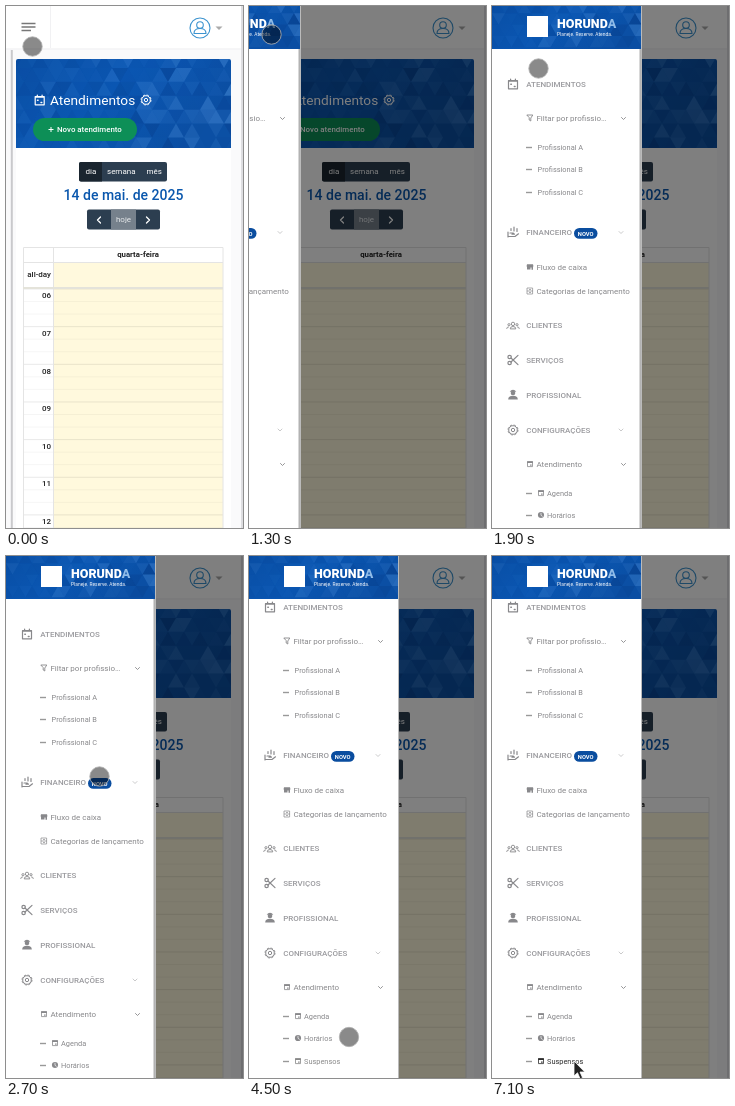
Recreate the animation shown at these times as an HTML page. Size 237 by 522 pixels, loop 8000 ms.

```html
<!DOCTYPE html>
<html lang="pt-BR">
<head>
<meta charset="utf-8">
<title>Agenda</title>
<style>
  html, body { margin: 0; width: 100%; height: 100%; overflow: hidden; background: #fff; }
  svg { display: block; width: 100%; height: 100%; }
  text { font-family: Roboto, sans-serif; font-size: 8px; white-space: pre; }
  .end { text-anchor: end; }
  .mid { text-anchor: middle; }
  .line { fill: none; stroke-linecap: round; stroke-linejoin: round; }
</style>
</head>
<body>
<svg viewBox="0 0 237 522" preserveAspectRatio="none">
  <defs>
    <linearGradient id="blue" x2="1" y2=".4">
      <stop offset="0" stop-color="#0a4fa5"/><stop offset=".5" stop-color="#0a56b2"/><stop offset="1" stop-color="#0b4fa4"/>
    </linearGradient>
    <clipPath id="bannerClip"><path d="M10 142V55q0-2 2-2H223q2 0 2 2V142Z"/></clipPath>
    <clipPath id="headClip"><rect width="149" height="43"/></clipPath>
    <g id="calendarIcon" class="line" stroke="currentColor">
      <path d="M-4.500-3.500h9v8.300h-9ZM-4.500-2.800h9M-2.400-5v1M2.400-5v1" stroke-width="1.200"/>
      <path d="M-2.200 .3h.6M1.300 2.500h.8" stroke-width="1.400"/>
    </g>
    <g id="gearIcon" fill="none" stroke="currentColor">
      <circle r="4.300"/><circle r="5" stroke-width=".9" stroke-dasharray="2.300 1.627"/><circle r="1.700"/>
    </g>
    <path id="chevron" class="line" d="M-2-1 0 1 2-1" stroke="currentColor" stroke-width=".9"/>
    <g id="userIcon" fill="currentColor">
      <circle cy="-2" r="2.300"/><path d="M-3.300-3.300Q-2-5.300 0-5.300t3.300 2ZM-4.800 4.500q0-3.700 4.800-3.700t4.800 3.700Z"/>
    </g>
    <g id="groupIcon" fill="none" stroke="currentColor" stroke-width=".9">
      <circle cy="-1.600" r="1.700"/><circle cx="-4" cy="-.8" r="1.100"/><circle cx="4" cy="-.8" r="1.100"/>
      <path d="M-2.800 3.400q0-2.400 2.800-2.400t2.800 2.400ZM-6.300 3.400q0-2 2.200-2M6.300 3.400q0-2-2.200-2"/>
    </g>
    <g id="scissorsIcon" class="line" stroke="currentColor" stroke-width="1.200">
      <circle cx="-3.400" cy="-3" r="1.700"/><circle cx="-3.400" cy="3" r="1.700"/><path d="M-2-2 5 4.600M-2 2 5-4.600"/>
    </g>
    <g id="financeIcon" class="line" stroke="currentColor" stroke-width="1.200">
      <path d="M-5 0v5M-5 4.500H2L5.500 1.800M-3 1h3l1.500 1.200H-1M-2-1.500v-2M1-1v-4M4-.5v-3"/>
    </g>
    <path id="filterIcon" class="line" d="M-2.800-3H2.800L.8 0V3L-.8 2V0Z" stroke="currentColor" stroke-width=".9"/>
    <path id="shopIcon" fill="currentColor" d="M-3-2.800H3L3.500-.5H3V2.800H1.500V.5H.5V2.500H-3V-.5H-3.500Z"/>
    <path id="boxIcon" class="line" d="M-2.600-3H2.600V3H-2.600ZM-2.600 0H2.600M-.6-1.500H.6M-.6 1.500H.6" stroke="currentColor" stroke-width=".7"/>
    <g id="dateIcon"><path d="M-2.500-2.200h5v4.800h-5Z" fill="none" stroke="currentColor" stroke-width=".8"/><path d="M-2.900-2.800h5.800v1.800h-5.800ZM.1 .4h1.500v1.300H.1Z" fill="currentColor"/></g>
    <g id="clockIcon"><circle r="3.100" fill="currentColor"/><path d="M0-1.800V.3L1.300 1.200" class="line" stroke="#fff" stroke-width=".7"/></g>
  </defs>

  <g id="page">
    <rect width="237" height="522" fill="#fafafb"/>
    <rect width="237" height="42" fill="#fff"/>
    <path d="M44.500 0V42M0 43H237" stroke="#f1f1f3"/>
    <path d="M5.800 44V522" stroke="#c9c9cc" stroke-width="2"/>
    <path d="M236 0V522" stroke="#dedee1" stroke-width="2"/>
    <path d="M15.500 17.500H29.500M15.500 21H29.500M15.500 24.500H25" stroke="#777" stroke-width="1.300"/>
    <g class="line" stroke="#3c93cf" stroke-width="1.100">
      <circle cx="194" cy="22" r="10"/><circle cx="194" cy="19" r="3.300"/><path d="M188 27.500q0-5 6-5t6 5Z"/>
    </g>
    <path d="M209.500 20.500h7l-3.500 3.600Z" fill="#aaa"/>
    <rect x="10" y="53" width="215" height="480" fill="#fff"/>
    <g clip-path="url(#bannerClip)">
      <rect x="10" y="53" width="215" height="89" fill="url(#blue)"/>
      <g id="bannerFacets"></g>
    </g>
    <g color="#fff">
      <use href="#calendarIcon" x="33.700" y="94"/><use href="#gearIcon" x="140" y="94"/>
    </g>
    <text x="44" y="99" fill="#fff" style="font-size:13.700px">Atendimentos</text>
    <rect x="27" y="112" width="104" height="23" rx="11.500" fill="#0d8f57"/>
    <path d="M42.500 123.500h5M45 121v5" stroke="#fff"/>
    <text x="51" y="126.300" fill="#fff" font-weight="500" style="font-size:7.900px">Novo atendimento</text>

    <rect x="73" y="156" width="88" height="19.500" rx="2" fill="#2c3e50"/>
    <path d="M96 156H75q-2 0-2 2v15.500q0 2 2 2H96Z" fill="#1a252f"/>
    <g fill="#fff"><text x="79.500" y="168.200">dia</text><text x="101" y="168.200">semana</text><text x="140.500" y="168.200">mês</text></g>
    <text x="117.500" y="194" class="mid" fill="#0a57ad" font-weight="500" style="font-size:14px">14 de mai. de 2025</text>
    <rect x="81" y="203.500" width="73" height="20" rx="2" fill="#2c3e50"/>
    <rect x="105" y="203.500" width="25" height="20" fill="#76818c"/>
    <text x="117.500" y="216.300" class="mid" fill="#e6e9eb">hoje</text>
    <path d="M94.500 211 91.500 214l3 3M140.500 211l3 3-3 3" class="line" stroke="#fff" stroke-width="1.300"/>

    <rect x="48" y="256" width="169" height="270" fill="#fff9dd"/>
    <g id="slots"></g>
    <path d="M17.500 530V241.500H217V530M47.500 241V530M17 256.500H217" fill="none" stroke="#e4e4e4"/>
    <path d="M17 282H217" stroke="#e4e3da" stroke-width="2"/>
    <g fill="#222" font-weight="700">
      <text x="132" y="251.300" class="mid" style="font-size:7.800px">quarta-feira</text>
      <text x="45" y="271" class="end" font-weight="500">all-day</text>
    </g>
  </g>

  <rect id="shade" width="237" height="522"/>

  <g id="sidebar">
    <rect width="149" height="522" fill="#fff"/>
    <g id="menu"></g>
    <rect id="scrollbar" x="147.500" y="43" width="1.500" height="479" fill="#999"/>
    <g clip-path="url(#headClip)">
      <rect width="149" height="43" fill="url(#blue)"/>
      <g id="headFacets"></g>
      <rect x="35" y="10" width="21" height="21" fill="#fff"/>
      <text x="65" y="22" fill="#fff" font-weight="900" style="font-size:12.500px">HORUND<tspan fill="#8fbbe8">A</tspan></text>
      <text x="65" y="30" fill="#fff" style="font-size:4.900px">Planeje. Reserve. Atenda.</text>
    </g>
    <rect x="149" width="1" height="522" fill="#bbb"/>
  </g>

  <circle id="touch" r="9.700" fill="#000" fill-opacity=".46" stroke="#b0b0b0" stroke-opacity=".85"/>
  <path id="arrow" d="M82 505v15l3.500-3.200 2.600 6 2.500-1.100-2.600-5.700h4.800Z" fill="#222" stroke="#fff" stroke-width=".8"/>
</svg>

<script>
const $ = id => document.getElementById(id);
const LOOP = 8000, STEP = 100;

// Rows of alternating triangles with slightly varying brightness
function facets(x0, y0, cols, rows, size) {
  let seed = 7, out = '';
  const random = () => (seed = seed * 16807 % 2147483647) / 2147483647;
  const half = size / 2, height = size * .87;
  for (let row = 0; row < rows; row++) for (let col = 0; col < cols; col++) {
    const x = x0 + (col - 1) * half, y = y0 + row * height;
    const up = (row + col) % 2;
    const fill = random() > .4 ? '#6fb0f5' : '#00296b';
    const opacity = random() ** 2 * .32 * (.3 + .7 * col / cols);
    out += `<path d="M${x} ${up ? y + height : y}h${size}l${-half} ${up ? -height : height}Z" fill="${fill}" opacity="${opacity}"/>`;
  }
  return out;
}
$('bannerFacets').innerHTML = facets(10, 48, 28, 7, 16);
$('headFacets').innerHTML = facets(0, -4, 25, 4, 13);

// Three slots per hour
const HOUR = 37.65;
let slots = '';
for (let hour = 0; hour < 7; hour++) {
  const y = 283 + hour * HOUR;
  for (let part = 0; part < 3; part++)
    slots += `<path d="M17 ${y + part * HOUR / 3}H217" stroke="#000" stroke-opacity="${part ? .04 : .09}"/>`;
  slots += `<text x="45" y="${y + 9.2}" class="end" fill="#222" font-weight="500">${String(hour + 6).padStart(2, '0')}</text>`;
}
$('slots').innerHTML = slots;

const SECTION = '#9a9a9e', ENTRY = '#88888b', FAINT = '#c4c4c6';
const icon = (name, x, y, color = ENTRY) => `<use href="#${name}" x="${x}" y="${y}" color="${color}"/>`;
const label = (text, x, y, size, fill, weight = 400) =>
  `<text x="${x}" y="${y + 2.8}" fill="${fill}" font-weight="${weight}" style="font-size:${size}px">${text}</text>`;
const section = (y, name, text) => icon(name, 21, y) + label(text, 34.2, y, 8, SECTION, 500);
const entry = (y, name, text) => icon(name, 38, y) + label(text, 44.4, y, 8, ENTRY);
const dash = y => `<path d="M34 ${y + .5}h6" stroke="#999" stroke-width="1.4"/>`;
const leaf = (y, text) => dash(y) + label(text, 45.5, y, 7.4, ENTRY);
const iconLeaf = (y, name, text) => dash(y) + icon(name, 49, y, 'currentColor') + label(text, 55, y, 7.4, 'currentColor');

$('menu').innerHTML = [
  section(78, 'calendarIcon', 'ATENDIMENTOS'),
  entry(112, 'filterIcon', 'Filtar por profissio…'), icon('chevron', 131.5, 112.5),
  leaf(141, 'Profissional A'), leaf(163, 'Profissional B'), leaf(186, 'Profissional C'),
  section(226, 'financeIcon', 'FINANCEIRO'), icon('chevron', 129, 226.5, FAINT),
  '<rect x="82" y="222" width="23.500" height="10.800" rx="5.400" fill="#0a4d9f"/>',
  '<text x="93.700" y="229.500" class="mid" fill="#fff" font-weight="700" style="font-size:5.800px">NOVO</text>',
  entry(261, 'shopIcon', 'Fluxo de caixa'),
  entry(285, 'boxIcon', 'Categorias de lançamento'),
  section(319.5, 'groupIcon', 'CLIENTES'),
  section(354, 'scissorsIcon', 'SERVIÇOS'),
  section(389, 'userIcon', 'PROFISSIONAL'),
  section(424, 'gearIcon', 'CONFIGURAÇÕES'), icon('chevron', 129, 424, FAINT),
  entry(458, 'dateIcon', 'Atendimento'), icon('chevron', 131.5, 458.5),
  `<g color="${ENTRY}">${iconLeaf(487, 'dateIcon', 'Agenda')}${iconLeaf(509, 'clockIcon', 'Horários')}</g>`,
  `<g id="suspended">${iconLeaf(532, 'dateIcon', 'Suspensos')}</g>`
].join('');

// Linear interpolation through [time, ...values] keys
function track(t, keys) {
  const next = keys.findIndex(key => key[0] > t);
  if (next === 0) return keys[0].slice(1);
  if (next < 0) return keys[keys.length - 1].slice(1);
  const [from, to] = [keys[next - 1], keys[next]];
  const k = (t - from[0]) / (to[0] - from[0]);
  return from.slice(1).map((v, i) => v + (to[i + 1] - v) * k);
}

const pointerPath = [
  [0, 26.5, 40.5], [200, 25, 31.5], [300, 25, 31.5], [600, 22.5, 28.5], [1400, 22.5, 28.5],
  [1900, 46.5, 62.5], [2000, 46.5, 62.5], [2700, 93.5, 220.5], [3700, 93.5, 220.5],
  [4500, 100, 481], [5100, 79, 499], [5500, 82.5, 507.5]
];
const slide = [[1200, -153], [1300, -98], [1400, -25], [1500, -4], [1600, 0]];
const dim = [[1200, 0], [1300, .5]];
const scroll = [[3100, 0], [3200, 10], [3300, 22], [3400, 27]];
const barFade = [[3900, .75], [4300, 0]];
const hover = [[6000, 136], [6300, 45]];

function draw(now) {
  const t = Math.floor(now % LOOP / STEP) * STEP;
  const [x, y] = track(t, pointerPath), [offset] = track(t, scroll), [tone] = track(t, hover);
  const arrow = t >= 6100 && t < 6500 || t >= 7100;
  $('shade').setAttribute('opacity', track(t, dim)[0]);
  $('sidebar').setAttribute('transform', `translate(${track(t, slide)[0]})`);
  $('menu').setAttribute('transform', `translate(0 ${-offset})`);
  $('scrollbar').setAttribute('y', 43 + offset * 25 / 27);
  $('scrollbar').setAttribute('opacity', track(t, barFade)[0]);
  $('suspended').setAttribute('color', `rgb(${tone},${tone},${tone})`);
  $('touch').setAttribute('transform', `translate(${x} ${y})`);
  $('touch').setAttribute('visibility', arrow ? 'hidden' : 'visible');
  $('arrow').setAttribute('visibility', arrow ? 'visible' : 'hidden');
}

const start = performance.now();
function frame() {
  draw(performance.now() - start);
  requestAnimationFrame(frame);
}
frame();
</script>
</body>
</html>
```
